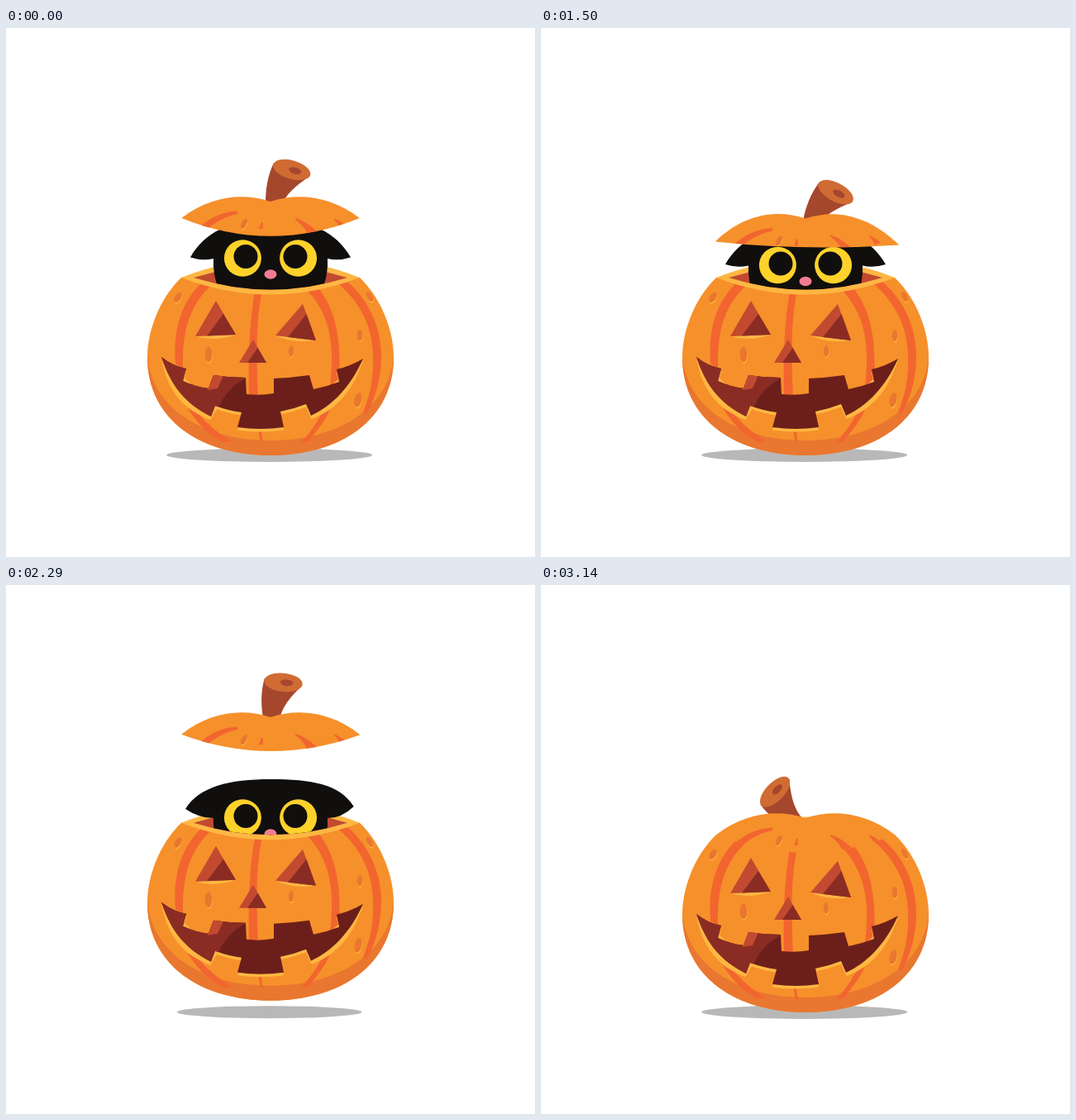
An HTML page with a canvas for the animation above (3.64 s loop, 640x640 px).

```html
<!DOCTYPE html>
<html lang="en">
<head>
<meta charset="utf-8">
<title>Cat in a pumpkin</title>
<style>
html, body { margin: 0; width: 100%; height: 100%; overflow: hidden; background: #fff; }
canvas { display: block; width: 100vmin; height: 100vmin; }
</style>
</head>
<body>
<canvas id="stage" width="640" height="640"></canvas>
<script>
const ctx = document.getElementById('stage').getContext('2d');
const LOOP = 3640, FPS = 14, LAST = 44;
const C = {
  orange: '#f6902b', shade: '#e9772f', stripe: '#f2652f', light: '#fdb742',
  lit: '#c14a30', mid: '#8a2c24', dark: '#6c1f1a',
  stem: '#a5472d', cut: '#d06b33', black: '#100f0d', yellow: '#fed22b',
  nose: '#f07c93', shadow: '#b8b8b8'
};

// Keys are [step, value] pairs.
const KEYS = {
  look: [[0, 0], [2.5, -11.5], [5, -11.5], [10.5, 11.8], [13, 11.8], [16, 0]],
  lid: [[16, 0], [21, 20.5], [25, 39], [26, 39], [30, -12.5], [32, -50], [33, -52],
    [35, -38], [38, 32], [40, 53.5], [42, 69], [43, 72]],
  bend: [[16, 0], [21, 1], [25, 1.8], [26, 1.8], [30, 0.6], [33, 0]],
  stem: [[16, 0], [21, 12], [25, 21], [26, 21], [30, 4], [35, -34], [38, -51], [41, -59], [43, -62]],
  head: [[16, 0], [21, 8.5], [25, 22], [27, 22], [30, 17], [33, -1], [35, 1.5], [38, 70], [41, 112]],
  ears: [[24, 0], [30, 0.5], [35, 1]],
  body: [[27, 0], [30, -8], [33, -15.5], [35, -13.7], [38, -9.3], [41, 0]],
  shadow: [[27, 124.5], [30, 116], [33, 111], [35, 113], [38, 118.7], [41, 124.5]]
};

// Monotone cubic interpolation: smooth, without overshoot.
function at(keys, x) {
  const n = keys.length;
  if (x <= keys[0][0]) return keys[0][1];
  if (x >= keys[n - 1][0]) return keys[n - 1][1];
  const slope = i => (keys[i + 1][1] - keys[i][1]) / (keys[i + 1][0] - keys[i][0]);
  const tangent = i => {
    if (i === 0 || i === n - 1) return 0;
    const a = slope(i - 1), b = slope(i);
    return a * b <= 0 ? 0 : 2 * a * b / (a + b);
  };
  let i = 0;
  while (keys[i + 1][0] < x) i++;
  const w = keys[i + 1][0] - keys[i][0], u = (x - keys[i][0]) / w, v = 1 - u;
  return keys[i][1] * (1 + 2 * u) * v * v + tangent(i) * w * u * v * v +
    keys[i + 1][1] * u * u * (3 - 2 * u) - tangent(i + 1) * w * u * u * v;
}

function fill(path, color) {
  ctx.fillStyle = color;
  ctx.fill(typeof path === 'string' ? new Path2D(path) : path);
}

function oval(x, y, rx, ry, color, deg = 0) {
  ctx.beginPath();
  ctx.ellipse(x, y, rx, ry, deg * Math.PI / 180, 0, 7);
  ctx.fillStyle = color;
  ctx.fill();
}

function seed(x, y, rx, ry, deg) {
  oval(x + 0.4, y + 1.4, rx, ry, C.light, deg);
  oval(x, y, rx, ry, C.shade, deg);
}

function moved(dx, dy, draw) {
  ctx.save();
  ctx.translate(dx, dy);
  draw();
  ctx.restore();
}

const BODY = new Path2D('M212 302C184 329 171 369 171 398C171 475 237 517 320 517' +
  'C403 517 469 475 469 398C469 369 456 329 428 302Q320 290 212 302Z');
const MOUTH = new Path2D('M188 398Q202 409 218 412L214 427Q229 434 245 436L251 420Q270 423 290 423' +
  'L291 443Q308 445 324 442L324 424Q346 423 367 420L372 437Q388 434 403 428L400 413Q417 409 432 400' +
  'C417 434 395 457 369 469L363 455Q348 461 332 464L336 483Q308 487 280 483L285 465Q269 463 253 457' +
  'L248 470C218 455 200 434 188 398Z');
const LIPS = 'M188 398C194 437 213 461 247 474L256 460ZM432 400C422 437 400 462 370 473L363 458Z';
const STRIPES = [
  'M240 305L254 306C222 333 213 365 214 412L205 406C202 364 212 330 240 305Z',
  'M302 314L311 314C302 350 303 395 305 446L294 446C293 400 294 355 302 314Z',
  'M361 314L374 310C399 338 406 375 403 430L392 434C398 385 393 345 361 314Z',
  'M398 306L407 302C440 327 455 365 454 400C453 430 445 452 436 467L432 465C442 440 445 420 444 395C443 360 428 330 398 306Z',
  'M220 460C233 481 248 494 263 501L273 500C256 490 242 478 231 464Z',
  'M305 486L309 486Q309 494 311 501L308 501Z',
  'M393 458C388 474 375 488 366 500L357 501C370 488 378 474 384 462Z'
];

function drawMouth() {
  fill(LIPS, C.light);
  moved(0, 3.5, () => fill(MOUTH, C.light));
  fill(MOUTH, C.dark);
  ctx.save();
  ctx.clip(MOUTH);
  fill('M180 390H291V423Q266 436 256 462L246 480H180Z', C.mid);
  fill('M250 416H265L256 436L244 438Z', C.lit);
  ctx.restore();
}

function drawBody() {
  fill(BODY, C.orange);
  ctx.save();
  ctx.clip(BODY);
  fill('M171 398C178 465 245 499 320 499C395 499 462 465 469 398V520H171Z', C.shade);
  ctx.restore();
  STRIPES.forEach(s => fill(s, C.stripe));
  seed(208, 326, 3.8, 6.8, 32);
  seed(245, 395, 4.4, 9.6, 0);
  seed(345, 391, 3.1, 7, 0);
  seed(428, 372, 3.3, 7, 0);
  seed(426, 450, 4.3, 9, 12);
  seed(440, 325, 3.2, 6.8, -27);

  fill('M229 373Q253 380 278 371Z', C.light);
  fill('M254 330L278 371L229 373Z', C.lit);
  fill('M263 346L278 371L243 372.5Z', C.mid);
  fill('M326 372Q348 382 375 378Z', C.light);
  fill('M359 334L375 378L326 372Z', C.lit);
  fill('M363.5 346L375 378L341 374Z', C.mid);
  fill('M299 377L315 405H282Z', C.lit);
  fill('M304.5 387L315 405H292Z', C.mid);
  drawMouth();

  fill('M212 302Q320 259 428 302Q320 343 212 302Z', C.light);
  fill('M227 302Q320 274 413 302Q320 331 227 302Z', C.lit);
}

function drawHead(look, ears) {
  const lx = 223 - 8 * ears, ly = 277.5 - 13 * ears;
  const rx = 417 + 5 * ears, ry = 277.5 - 17 * ears;
  const lift = 30 - 4 * ears;
  const p = new Path2D();
  p.moveTo(lx, ly);
  p.bezierCurveTo(lx + 17, ly - lift, 270, 232, 320, 232);
  p.bezierCurveTo(370, 232, rx - 17, ry - lift, rx, ry);
  p.quadraticCurveTo(403 + 4 * ears, 282 - 4 * ears, 389, 279);
  p.lineTo(389, 288);
  p.quadraticCurveTo(388, 304, 382, 318);
  p.lineTo(382, 400);
  p.lineTo(258, 400);
  p.lineTo(258, 318);
  p.quadraticCurveTo(252, 304, 251, 288);
  p.lineTo(251, 279);
  p.quadraticCurveTo(237 - 4 * ears, 282 - 4 * ears, lx, ly);
  fill(p, C.black);
  for (const side of [-1, 1]) {
    oval(320 + side * 33.6, 278.5, 22.5, 22.3, C.yellow);
    oval(320 + side * 30 + look, 276.5, 14.5, 14.5, C.black);
  }
  oval(320, 298, 7.5, 5.8, C.nose);
}

function drawStem(deg) {
  ctx.save();
  ctx.translate(320, 227);
  ctx.rotate(deg * Math.PI / 180);
  ctx.translate(-320, -227);
  fill('M324 163C316 180 314 196 314 213L320 224L332 218C338 201 350 191 368 179Z', C.stem);
  oval(345.7, 171.5, 23.3, 11.2, C.cut, 16);
  oval(349.7, 172.7, 7.8, 3.9, C.stem, 16);
  ctx.restore();
}

function drawLid(bend) {
  const lx = 212.3 - 1.5 * bend, ly = 230 + 8 * bend;
  const rx = 427.9 + 5.5 * bend, ry = 230 + 12 * bend;
  const p = new Path2D();
  p.moveTo(lx, ly);
  p.bezierCurveTo(247, 203, 287, 199, 320, 210);
  p.bezierCurveTo(353, 199, 393, 203, rx, ry);
  p.quadraticCurveTo(320, 2 * (251.8 - 7 * bend) - (ly + ry) / 2, lx, ly);
  fill(p, C.orange);
  ctx.save();
  ctx.clip(p);
  fill('M280 221.5C262 222 244 231 233 242L242 245C252 235 265 228 280 225Z', C.stripe);
  fill('M350 230C361 233 370 240 378 248L366 252C362 242 356 236 350 232Z', C.stripe);
  fill('M397 230Q404 233 411 239L404 242Q401 235 397 232Z', C.stripe);
  fill('M306 243L309 235L311 235L310.5 243Z', C.stripe);
  seed(288, 237, 3.1, 6.6, 27);
  ctx.restore();
}

function render(step) {
  const v = {};
  for (const k in KEYS) v[k] = at(KEYS[k], step);
  ctx.fillStyle = '#fff';
  ctx.fillRect(0, 0, 640, 640);
  oval(318.7, 516.7, v.shadow, 8.2 - (124.5 - v.shadow) * 0.06, C.shadow);
  moved(0, v.body, drawBody);

  // The front rim hides the lower part of the cat.
  ctx.save();
  const hole = new Path2D('M0 0H640V302H413Q320 331 227 302H0Z');
  ctx.translate(0, v.body);
  ctx.clip(hole);
  moved(0, v.head - v.body, () => drawHead(v.look, v.ears));
  ctx.restore();

  moved(0, v.lid, () => {
    drawStem(v.stem);
    drawLid(v.bend);
  });
}

const start = performance.now();
function tick() {
  const t = (performance.now() - start) % LOOP;
  render(Math.min(LAST, Math.floor((t + 4.5) * FPS / 1000)));
  requestAnimationFrame(tick);
}
tick();
</script>
</body>
</html>
```
